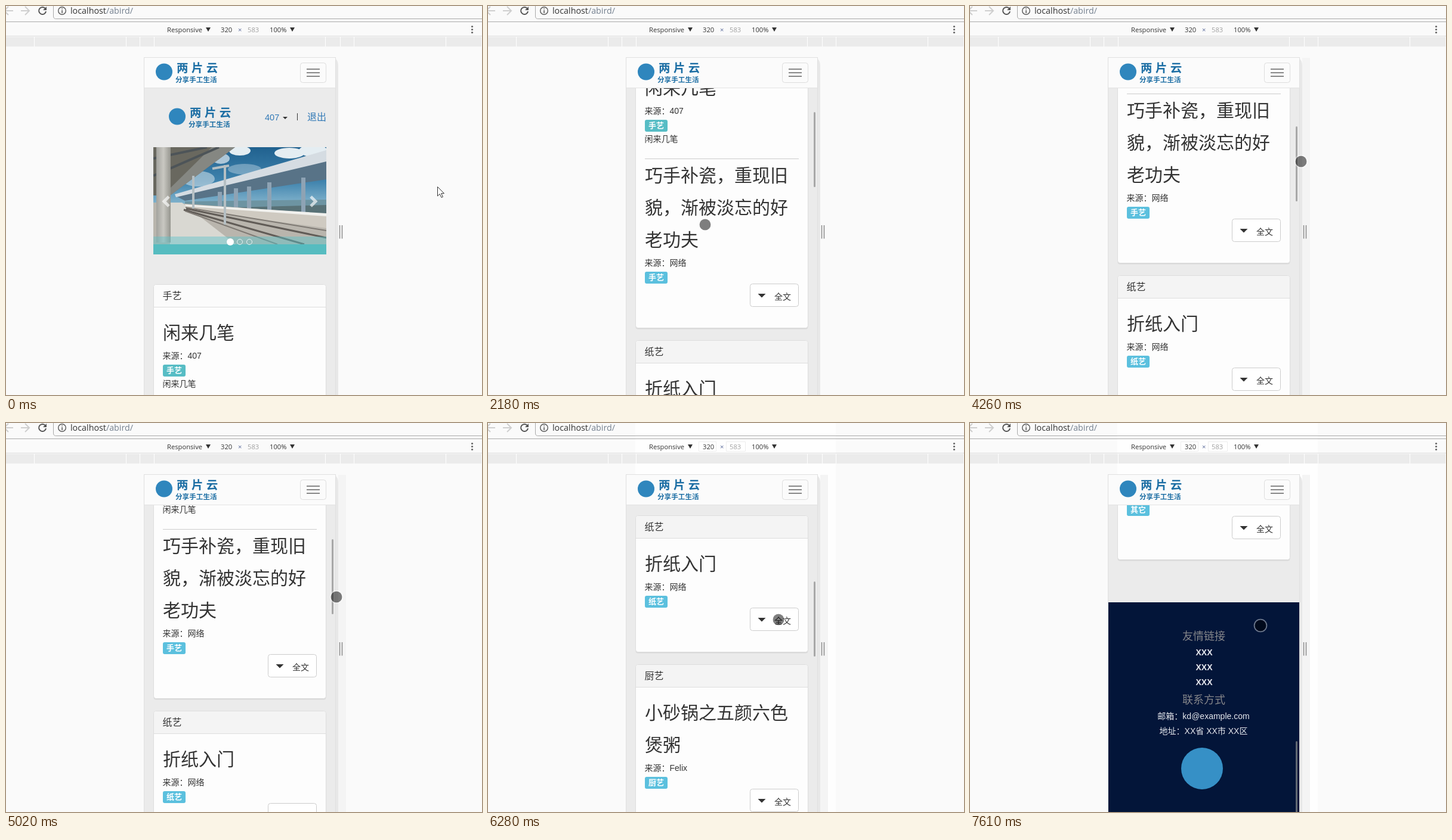
An HTML page for the animation above (8 s loop, 798 by 653 pixels).

```html
<!DOCTYPE html>
<html lang="zh-CN">
<head>
<meta charset="utf-8">
<title>Responsive preview</title>
<style>
html, body { margin: 0; width: 100%; height: 100%; overflow: hidden; background: #fafafa; }
svg { display: block; }
text { font-family: "Liberation Sans", "Noto Sans CJK SC", sans-serif; white-space: pre; fill: #333; }
.ui text { font-family: "Open Sans", sans-serif; font-size: 11.2px; }
.title { font-weight: 300; }
.badge { font-weight: 900; fill: #fff; }
.brand text { font-weight: 900; fill: #1c6ea4; }
.link { fill: #337ab7; }
.foot text { text-anchor: middle; fill: #e6e8ee; }
.foot .head { fill: #85868a; }
</style>
</head>
<body>
<svg width="798" height="653" viewBox="0 0 798 653">
  <defs>
    <clipPath id="view"><rect x="232" y="138" width="320" height="515"/></clipPath>
    <clipPath id="slide"><rect x="247" y="237" width="290" height="163"/></clipPath>
    <linearGradient id="sky" x2="0" y2="1">
      <stop offset="0" stop-color="#20618f"/><stop offset=".35" stop-color="#3f83ad"/><stop offset=".7" stop-color="#a3cbdc"/>
    </linearGradient>
    <linearGradient id="pillar"><stop offset="0" stop-color="#a3a39e"/><stop offset=".5" stop-color="#c9c8c2"/><stop offset="1" stop-color="#96968f"/></linearGradient>
    <g id="brand" class="brand">
      <circle cx="265" cy="110.500" r="14" fill="#2f86bd"/>
      <text x="286" y="110.500" font-size="19.500">两 片 云</text>
      <text x="284" y="128" font-size="11.600">分享手工生活</text>
    </g>
  </defs>

  <rect width="798" height="653" fill="#fafafa"/>
  <rect id="column" x="247" width="336" height="653" fill="#fefefe"/>

  <g class="ui">
    <path d="M79.500 0V17q0 4.500 4 4.500H798" fill="none" stroke="#a8a8a8"/>
    <g fill="none" stroke="#cfcfcf" stroke-width="2">
      <path d="M12 8H-2M4 1L-3 8l7 7M25 8H39M32 1l7 7-7 7"/>
      <path d="M66 4.500A6 6 0 1 0 67 9" stroke="#555"/>
    </g>
    <path d="M68 1V7H62Z" fill="#555"/>
    <circle cx="94" cy="8" r="6.300" fill="none" stroke="#555" stroke-width="1.400"/>
    <path d="M93.300 4h1.500v1.600h-1.500zM93.300 7h1.500v5h-1.500z" fill="#555"/>
    <text x="108" y="13" style="font-size:14.3px">localhost<tspan fill="#74808f">/abird/</tspan></text>
    <path d="M0 26.500H798" stroke="#a9a9a9"/>
    <path d="M0 50.500H798" stroke="#dcdcdc"/>
    <g id="inputs" fill="#fff" stroke="#ededed"><path d="M353.500 31.500h29v16h-29zM399.500 31.500h32v16h-32z"/></g>
    <text x="270" y="44">Responsive</text>
    <text x="360" y="44">320</text>
    <text x="389" y="44" style="fill:#5a6a9a">×</text>
    <text x="405" y="44" style="fill:#a0a0a0">583</text>
    <text x="442" y="44">100%</text>
    <path d="M335 36h8l-4 7zM476 36h8l-4 7z" fill="#333"/>
    <g fill="#666"><circle cx="781.500" cy="34.500" r="1.600"/><circle cx="781.500" cy="39.500" r="1.600"/><circle cx="781.500" cy="44.500" r="1.600"/></g>
    <rect y="52" width="797" height="16" fill="#ebebeb"/>
    <path d="M47.500 52v16M201.500 52v16M224.500 52v16M248.500 52v16M535.500 52v16M560.500 52v16M583.500 52v16M737.500 52v16" stroke="#fff"/>
  </g>

  <rect id="gutter" x="557" y="87" width="13" height="566" fill="#f4f4f4"/>
  <path d="M552 88q5 4 5 12V653h-5z" fill="#e8e8e8"/>
  <path d="M559.500 368v22.500M563.500 368v22.500" stroke="#8a8a8a" stroke-width="1.500"/>
  <rect x="231" y="86" width="322" height="567" fill="#e0e0e0"/>
  <rect x="232" y="138" width="320" height="515" fill="#ebebeb"/>

  <g clip-path="url(#view)">
    <g id="page">
      <use href="#brand" x="22" y="75"/>
      <text class="link" x="434" y="192" font-size="14.500">407</text>
      <path d="M464 186h8l-4 4z" fill="#333"/>
      <path d="M488.500 180v12" stroke="#333"/>
      <text class="link" x="505" y="192" font-size="16">退出</text>

      <g clip-path="url(#slide)">
        <rect x="247" y="237" width="290" height="163" fill="url(#sky)"/>
        <g fill="#e4edf2">
          <ellipse cx="392" cy="243" rx="18" ry="8"/><ellipse cx="475" cy="247" rx="25" ry="9"/><ellipse cx="515" cy="243" rx="24" ry="10"/>
          <ellipse cx="360" cy="256" rx="15" ry="9" opacity=".7"/><ellipse cx="322" cy="290" rx="28" ry="13" opacity=".5"/><ellipse cx="400" cy="274" rx="28" ry="9" opacity=".35"/>
        </g>
        <path d="M247 237H384L275 318H247Z" fill="#69685f"/>
        <path d="M345 237h39L275 318v-12Z" fill="#858782"/>
        <path d="M247 256l90-19M247 285l110-48" stroke="#4d5458" stroke-width="4"/>
        <path d="M300 328L537 325V350H300Z" fill="#6d94a2"/>
        <path d="M390 338l147-4v18H390Z" fill="#587176"/>
        <path d="M285 319L537 259V291L300 327Z" fill="#587387"/>
        <path d="M283 316L537 242V261L285 321Z" fill="#d5dce2"/>
        <path d="M358.500 312v28M385.500 306v36M407.500 303v44M441.500 296v54M498.500 288v62" stroke="#8ea3b4" stroke-width="7"/>
        <path d="M275 330L537 349V400H247V330Z" fill="#b9b5ad"/>
        <path d="M300 334L537 349V373L300 341Z" fill="#cfcac1"/>
        <path d="M300 333L537 348v5L300 336Z" fill="#f1f1ee"/>
        <path d="M275 330h20l90 70H275Z" fill="#d9d8d2"/>
        <path d="M298 342L500 400M302 340L537 389" stroke="#615c57" stroke-width="3"/>
        <path d="M300 344L455 400M301 338L537 377" stroke="#7e7973" stroke-width="2"/>
        <path d="M367 267V367M346 273L374 268M314 285v55" stroke="#b5bfc3" stroke-width="4"/>
        <rect x="252" y="237" width="24" height="160" fill="url(#pillar)"/>
        <rect x="247" y="387" width="290" height="13" fill="#5bc0c8" opacity=".45"/>
      </g>
      <rect x="247" y="400" width="290" height="17" fill="#56bcc0"/>
      <path d="M273 320l-8 8 8 8M511 320l8 8-8 8" fill="none" stroke="#fff" stroke-width="5" opacity=".65"/>
      <circle cx="376" cy="396" r="6" fill="#fff"/>
      <g fill="none" stroke="#e8f4f4"><circle cx="392" cy="396" r="4.500"/><circle cx="408" cy="396" r="4.500"/></g>

      <g id="cards"></g>

      <g class="foot" transform="translate(0 2057)">
        <rect x="232" y="301" width="320" height="400" fill="#031539"/>
        <text class="head" x="392" y="363.500" font-size="18">友情链接</text>
        <text x="392.500" y="390" font-size="14" font-weight="bold">XXX</text>
        <text x="392.500" y="415" font-size="14" font-weight="bold">XXX</text>
        <text x="392.500" y="440" font-size="14" font-weight="bold">XXX</text>
        <text class="head" x="392" y="470.500" font-size="18">联系方式</text>
        <text x="391.500" y="497" font-size="14">邮箱：kd@example.com</text>
        <text x="391.500" y="522" font-size="14">地址：XX省 XX市 XX区</text>
        <circle cx="389" cy="580" r="35" fill="#3690c6"/>
      </g>
    </g>
    <rect id="thumb" x="546" width="3" height="126" rx="1.500" fill="#8c8c8c" opacity=".7"/>
  </g>

  <rect x="232" y="87" width="320" height="50" fill="#fbfbfb"/>
  <path d="M232 137.500H552" stroke="#e3e3e3"/>
  <use href="#brand"/>
  <rect x="493.500" y="95.500" width="43" height="33" rx="4" fill="none" stroke="#ddd"/>
  <path d="M504 106h22M504 112h22M504 118h22" stroke="#888" stroke-width="2"/>

  <path id="arrow" d="M.5.5V16l3.700-3.500 2.800 6 2.400-1.100-2.700-5.800H11.500Z" fill="#fff" stroke="#333"/>
  <g id="touch">
    <circle r="9.500" fill="#000" opacity=".5"/>
    <circle r="10.400" fill="none" stroke="#fff" stroke-width="1.800" opacity=".42"/>
  </g>
</svg>
<script>
const el = id => document.getElementById(id);
const label = (x, y, size, str, cls = '', anchor = 'start') =>
  `<text x="${x}" y="${y + size * 0.37}" font-size="${size}" class="${cls}" text-anchor="${anchor}">${str}</text>`;

const card = (top, bottom, name, tint = '#f4f4f4') => `
  <rect x="247.500" y="${top + 1.5}" width="289" height="${bottom - top}" rx="4" fill="#d9d9d9"/>
  <rect x="247.500" y="${top + .5}" width="289" height="${bottom - top - 1}" rx="4" fill="#fdfdfd" stroke="#ddd"/>
  <path d="M248 ${top + 38}V${top + 5}q0-4 4-4H532q4 0 4 4V${top + 38}Z" fill="${tint}"/>
  <path d="M248 ${top + 38.5}H536" stroke="#ddd"/>` + label(262.5, top + 19, 16, name);

const moreButton = y => `
  <rect x="439.500" y="${y + .5}" width="81" height="38" rx="4" fill="#fff" stroke="#ccc"/>
  <path d="M452.500 ${y + 17}h13l-6.500 6.500z" fill="#333"/>` + label(480, y + 22, 14, '全文');

const rule = y => `<path d="M263 ${y + .5}H521" stroke="#ccc"/>`;

function article(y, titles, source, tag, body = [], more = true, tint = '#5bc0de') {
  const end = y + 54 * (titles.length - 1);
  return titles.map((s, i) => label(263, y + 54 * i, 30, s, 'title')).join('')
    + label(262.5, end + 39, 14, '来源：' + source)
    + `<rect x="263" y="${end + 54}" width="38" height="20" rx="3" fill="${tint}"/>`
    + label(282, end + 63.5, 13, tag, 'badge', 'middle')
    + body.map((s, i) => label(262.5, end + 86 + 25 * i, 14, s)).join('')
    + (more ? moreButton(end + 74 + 25 * body.length) : '');
}

const recipe = [
  '周末闲来无事，用小锅试了几样新菜，', '顺手把老诗改了改，博大家一笑。',
  '米要先泡半小时，青豆与玉米洗净，', '香菇切丁，腊肠切片，一起下锅炒香，',
  '再加水没过米面，小火慢慢收干。', '1、举头望明月，低头啃鸡腿。',
  '饭后来一杯清茶最好。   2、人比', '黄花瘦，犹记红烧肉。   3、朱门豆腐臭，',
  '胜似吃排骨。--臭豆腐   4、清水出芙蓉，', '玉米也……'];

el('cards').innerHTML =
  card(467, 952, '手艺', '#fbfbfb')
  + article(548, ['闲来几笔'], '407', '手艺', ['闲来几笔'], false, '#57bdc5')
  + rule(667)
  + article(695, ['巧手补瓷，重现旧', '貌，渐被淡忘的好', '老功夫'], '网络', '手艺')
  + card(972, 1202, '纸艺')
  + article(1053, ['折纸入门'], '网络', '纸艺')
  + card(1222, 1983, '厨艺')
  + article(1303, ['小砂锅之五颜六色', '煲粥'], 'Felix', '厨艺')
  + rule(1502)
  + article(1531, ['古诗里的家常味道', '新编'], '网络', '厨艺', recipe)
  + card(2004, 2287, '其他')
  + article(2085, ['亲手编平安结，系', '住心愿与牵挂'], '网络', '其它');

const ticks = [0, 290, 450, 600, 760, 910, 1070, 1220,
  1340, 1460, 1580, 1720, 1860, 2010, 2150, 2300,
  2890, 3040, 3160, 3280, 3430, 3580, 3740, 3890,
  4140, 4290, 4430, 4580, 4730, 4880, 5020, 5170,
  5290, 5450, 5600, 5880, 6020, 6150, 6280, 6400, 6600, 6800,
  7070, 7190, 7330, 7470, 7610];

const scrollKeys = [[0, 0], [1460, 0], [2300, 500], [3160, 500], [3890, 520], [4140, 520],
  [5020, 489], [5170, 510], [5750, 510], [6280, 817], [6800, 1710], [6930, 1710], [7610, 2057]];
const arrowKeys = [[200, 723, 303], [1220, 608, 362]];
const touchKeys = [[1340, 520, 366], [1460, 364, 367], [2300, 364, 367], [3160, 548, 314], [3890, 556, 294],
  [4140, 555, 261], [5020, 554, 292], [5170, 554, 271], [5600, 487, 330], [6800, 487, 330], [7610, 487, 340]];

function at(keys, t) {
  const i = keys.findIndex(k => k[0] > t);
  if (i === 0) return keys[0].slice(1);
  if (i < 0) return keys[keys.length - 1].slice(1);
  const [a, b] = [keys[i - 1], keys[i]];
  const p = (t - a[0]) / (b[0] - a[0]);
  return a.slice(1).map((v, n) => v + (b[n + 1] - v) * p);
}

const show = (id, on) => el(id).style.display = on ? '' : 'none';
const move = (id, x, y) => el(id).setAttribute('transform', `translate(${Math.round(x)} ${Math.round(y)})`);
const start = performance.now();

function draw(now) {
  const time = Math.max(0, now - start) % 8000;
  const t = ticks.filter(k => k <= time).pop();
  const [scroll] = at(scrollKeys, t);
  move('page', 0, -scroll);
  move('thumb', 0, 89.3 + scroll * 0.2162);
  move('arrow', ...at(arrowKeys, t));
  move('touch', ...at(touchKeys, t));
  show('arrow', t < 1340);
  show('touch', t >= 1340);
  show('thumb', t >= 1580);
  show('gutter', t >= 3280);
  show('column', t >= 5290);
  show('inputs', t >= 5290);
  requestAnimationFrame(draw);
}
draw(start);
</script>
</body>
</html>
```
